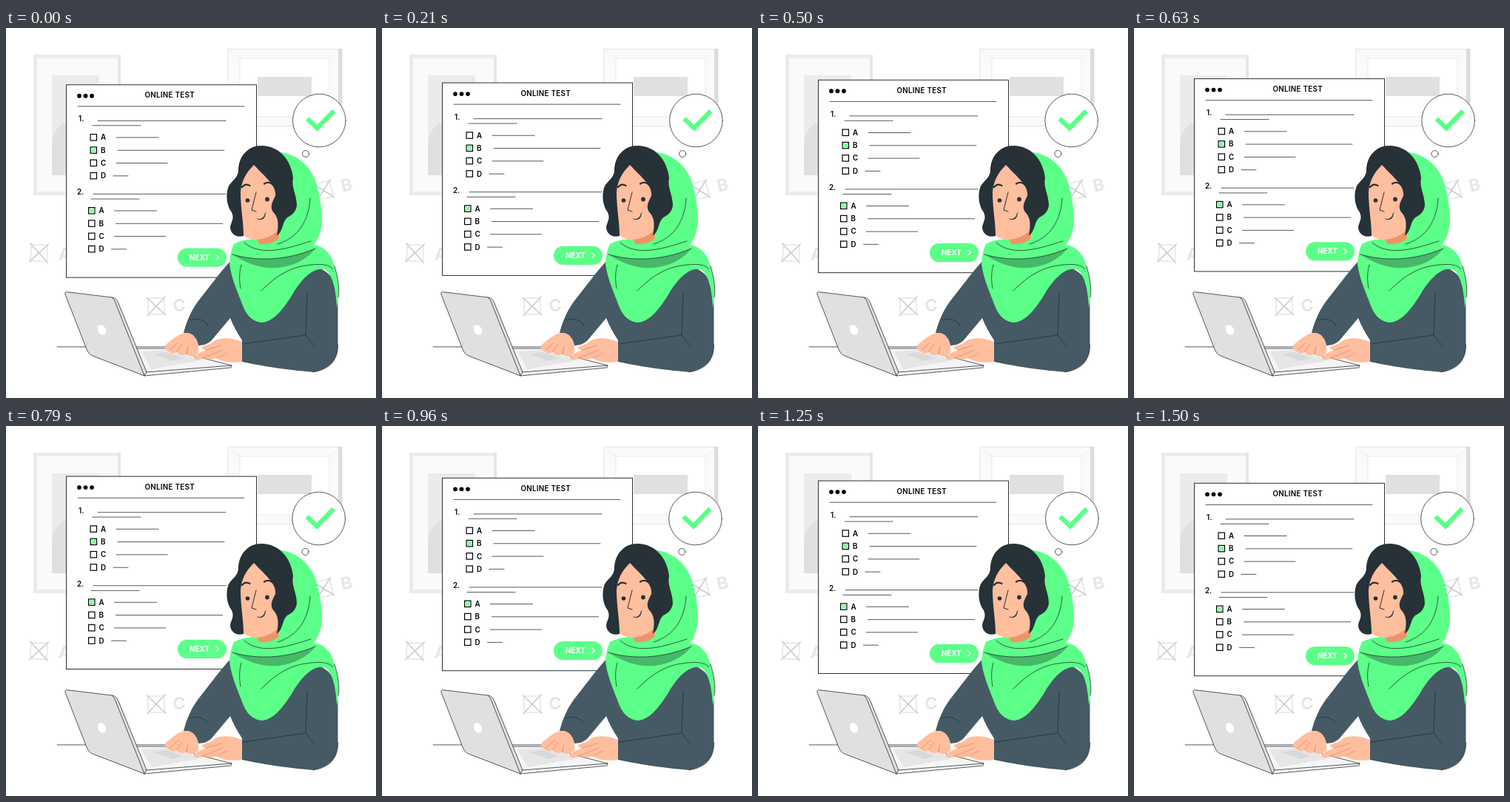
Animation, 500 px wide and 500 px high, one loop 1540 ms. Source, as an HTML page:

```html
<!DOCTYPE html>
<html lang="en">
<head>
<meta charset="utf-8">
<title>Online test</title>
<style>
  html, body { margin: 0; width: 100%; height: 100%; overflow: hidden; background: #fff; }
  svg { display: block; width: 100vw; height: 100vh; }
  text { font: 600 9.8px Inter, "Open Sans", sans-serif; fill: #000; }
  .faint text { font-size: 23px; font-weight: 700; fill: #e6e6e6; text-anchor: middle; }
  .line { fill: none; stroke: #263238; stroke-width: .8; stroke-linecap: round; stroke-linejoin: round; }
  .green { fill: #5cff87; }
  .dark { fill: #263238; }
  .skin { fill: #ffbe9d; }
  .sweater { fill: #455a64; }
</style>
</head>
<body>
<svg viewBox="0 0 500 500">
  <!-- wall pictures -->
  <g>
    <path fill="#ebebeb" d="M37 36h118v190H37z"/>
    <path fill="#e4e4e4" d="M152 36h3v190h-3z"/>
    <path fill="#fafafa" d="M42 41h109v180H42z"/>
    <path fill="#ebebeb" d="M62 64h64v135H62z"/>
    <path fill="#e0e0e0" d="M62 199V157C64 140 72 128 86 125V199z"/>
    <path fill="#fafafa" stroke="#e6e6e6" d="M299.500 28.500h150v104h-150z"/>
    <path fill="#dcdcdc" d="M449 28h5.500v104.500H449z"/>
    <path fill="#fff" stroke="#e6e6e6" stroke-width=".8" d="M316 41h121v79H316zM300 29l16 12M449 29l-12 12M449 132l-12-12"/>
    <path fill="#e0e0e0" d="M340 66h73v26h-73z"/>
  </g>
  <g class="faint" id="faint"></g>
  <path class="line" d="M69 430.900H215"/>

  <g id="sheet">
    <rect x="81.500" y="77.300" width="257" height="260.400" fill="#fff" stroke="#263238"/>
    <path class="line" d="M97 106.400H322"/>
    <g id="questions"></g>
    <text x="221.200" y="95" text-anchor="middle" letter-spacing=".3">ONLINE TEST</text>
    <circle cx="99" cy="92.300" r="2.900"/><circle cx="107.500" cy="92.300" r="2.900"/><circle cx="116" cy="92.300" r="2.900"/>
    <rect class="green" x="232" y="298" width="66" height="25.300" rx="12.600"/>
    <text x="248" y="314.200" style="fill:#fff;font-weight:700">NEXT</text>
    <path d="M283.500 307l4 3.600-4 3.600" fill="none" stroke="#fff" stroke-width="1.300"/>
  </g>

  <g id="bubble">
    <circle class="line" cx="423.500" cy="125" r="35.800" style="fill:#fff"/>
    <circle class="line" cx="405.300" cy="170" r="4.500" style="fill:#fff"/>
    <path d="M407.500 122.500L421 135.300 443.500 112" fill="none" stroke="#5cff87" stroke-width="6.500"/>
  </g>

  <!-- body -->
  <path class="sweater" d="M304 314C286 334 271 355 259 370C249 384 244 397 240 412C250 411 258 418 260 429C268 429 273 426 277 423L303 392C307 402 313 413 319 422V451C350 458 390 463 415 465C440 460 448.500 447 448.500 428V375C448 350 445 335 425 325L330 300Z"/>
  <path class="line" d="M407 358L405 415 418 431M405 415L320 427M248 395C258 391 268 394 273 402M448.500 428C448.500 447 440 461 415 465"/>

  <!-- scarf -->
  <path class="green" d="M362 167C392 168 410 185 418 206C424 224 427 245 427 262C426 277 421 287 416 293C430 295 440 305 444 322C449 338 451 352 449 364L447 378C446 355 442 335 432 327C420 322 405 332 390 355C378 376 362 398 345 398C332 396 324 388 318 370C310 350 304 335 302 318C303 305 305 298 308 292C318 286 330 285 340 285L366 275L392 235L352 172Z"/>
  <path fill="#46b868" d="M306 306C325 312 352 314 376 310C395 307 408 302 418 298C408 311 392 321 368 324C345 326 325 318 306 306Z"/>
  <path class="line" d="M411 230C409 260 396 283 367 292M322 290C345 311 386 296 412 288M306 306C325 312 352 314 376 310C395 307 408 302 418 298M345 355C360 340 380 324 405 321C425 318 437 319 442 326M318 320C315 331 315 340 317 352M444 322C449 338 451 352 449 364"/>

  <!-- head -->
  <path class="skin" d="M333 180L308 214V250L319 279C326 285 338 287 341 286L342 291C352 293 362 290 369 284V255L380 215L352 180Z"/>
  <path fill="#eb9668" d="M339 286C350 285 360 281 367 274L369 284C362 291 352 293 342 292Z"/>
  <path class="dark" d="M345 159C370 159 386 180 388 203C385 214 393 226 393 240C391 251 385 253 380 256C373 262 375 274 366 281C368 268 369 259 363 251C355 243 360 235 364 227C366 214 352 203 335 185C324 196 318 207 317 222C317 244 321 262 321 281C310 284 303 277 303 269C304 262 309 258 305 249C298 240 297 226 300 216C303 207 314 204 314 191C315 172 328 159 345 159Z"/>
  <path fill="none" stroke="#263238" stroke-width="2.200" stroke-linecap="round" d="M319 215C322 211 326 211 329.500 213M349 210.500C353 207.500 358 209 361 212"/>
  <circle class="dark" cx="326.500" cy="233" r="2.800"/><circle class="dark" cx="353" cy="231.500" r="2.900"/>
  <path class="line" style="stroke-width:1" d="M338 222L332 246 338 248M340 258C345 260 350 257 350.500 250"/>
  <path class="dark" d="M342 258.500C346 258 349 255 350 251C351 256 347 260 342 258.500Z"/>

  <!-- laptop -->
  <path class="line" style="fill:#f5f5f5" d="M176 433L215 433 305 456 304 459 187 470Z"/>
  <path fill="#e6e6e6" d="M183 437L222 435 265 449 196 461Z"/>
  <path fill="#d9d9d9" d="M200 441L216 438 240 446 224 450Z"/>
  <path fill="#e0e0e0" d="M80 360C79 357 81 356 85 357L143 364C148 365 150 367 152 372L190 465 187 470 117 443C112 441 111 438 109 434Z"/>
  <path class="line" d="M80 360C79 357 81 356 85 357L143 364C148 365 150 367 152 372L190 465 187 470 117 443C112 441 111 438 109 434ZM143 364C146 366 147 369 149 374L187 470M190 465L305 456"/>
  <ellipse cx="129.500" cy="408" rx="5.200" ry="7.200" transform="rotate(-28 129.500 408)" fill="#fff"/>

  <!-- hands -->
  <path class="skin" d="M242 412C234 413 227 419 217 427C213 431 215 437 220 436C220 440 226 441 231 437C234 443 240 443 244 440C248 446 256 443 260 439V429C258 418 252 411 242 412Z"/>
  <path class="skin" d="M319 424C305 418 292 418 283 422C278 425 275 428 270 429C262 431 263 434 270 435C263 438 257 441 254 445C254 449 260 449 266 446C272 448 279 448 285 446C292 452 307 453 319 451Z"/>
  <path fill="none" stroke="#e58b62" stroke-width=".8" stroke-linecap="round" d="M220 436L233 425M231 437L238 427M244 440L246 430M270 435L291 429M266 446L293 435M285 446L299 439"/>
</svg>
<script>
const $ = id => document.getElementById(id);
const rule = (x1, x2, y) => `<path class="line" d="M${x1} ${y}H${x2}"/>`;
const cross = (r, color, width) =>
  `<path fill="none" stroke="${color}" stroke-width="${width}" d="M${-r} ${-r}L${r} ${r}M${r} ${-r}L${-r} ${r}"/>`;

// Four answers: x is the left edge, y the middle of the first row.
function answers(x, y, chosen) {
  const ends = [[35, 92], [37, 181], [35, 104], [31, 51]];
  return ends.map(([from, to], i) => {
    const cy = y + i * 17.3;
    const tick = i === chosen ? cross(3.2, '#5cff87', 1.7) : '';
    return `<g transform="translate(${x + 4.3} ${cy})">
      <rect x="-4.200" y="-4.200" width="8.400" height="8.400" fill="#fff" stroke="#000" stroke-width="1.200"/>${tick}</g>
      <text x="${x + 14}" y="${cy + 3.6}">${'ABCD'[i]}</text>` + rule(x + from, x + to, cy + .2);
  }).join('');
}

$('questions').innerHTML =
  '<text x="98" y="127">1.</text>' + rule(124, 297, 125.9) + rule(117, 182, 132.3) + answers(114, 148.3, 1) +
  '<text x="96" y="226">2.</text>' + rule(118, 297, 224.9) + rule(115, 180, 231.6) + answers(111.5, 247.3, 0);

const faintMark = (x, y, letter, dx, angle) => `<g transform="translate(${x} ${y}) rotate(${angle})">
  <path d="M-11-11H11V11H-11z" fill="none" stroke="#e8e8e8" stroke-width="1.800"/>
  ${cross(12.5, '#e4e4e4', 2.2)}${cross(13, '#b0b0b0', .6)}
  <text x="${dx}" y="8">${letter}</text></g>`;

$('faint').innerHTML = faintMark(44.5, 304, 'A', 35, 3) + faintMark(203, 376, 'C', 31, -2) + faintMark(429, 219.5, 'B', 32, -13);

const LOOP = 1540, LEAD = 40;
const SHAKE = [0, -1, 2, -4, 4, -4, 4, -4, 2, -1, 0];

function draw() {
  const u = ((performance.now() + LEAD) % LOOP) / LOOP;
  const lift = 10 * (1 - Math.abs(1 - 2 * u));
  const i = Math.floor(u * 10);
  const shift = SHAKE[i] + (SHAKE[i + 1] - SHAKE[i]) * (u * 10 - i);
  $('sheet').setAttribute('transform', `translate(0 ${-lift})`);
  $('bubble').setAttribute('transform', `translate(${shift} 0)`);
  requestAnimationFrame(draw);
}
draw();
</script>
</body>
</html>
```
